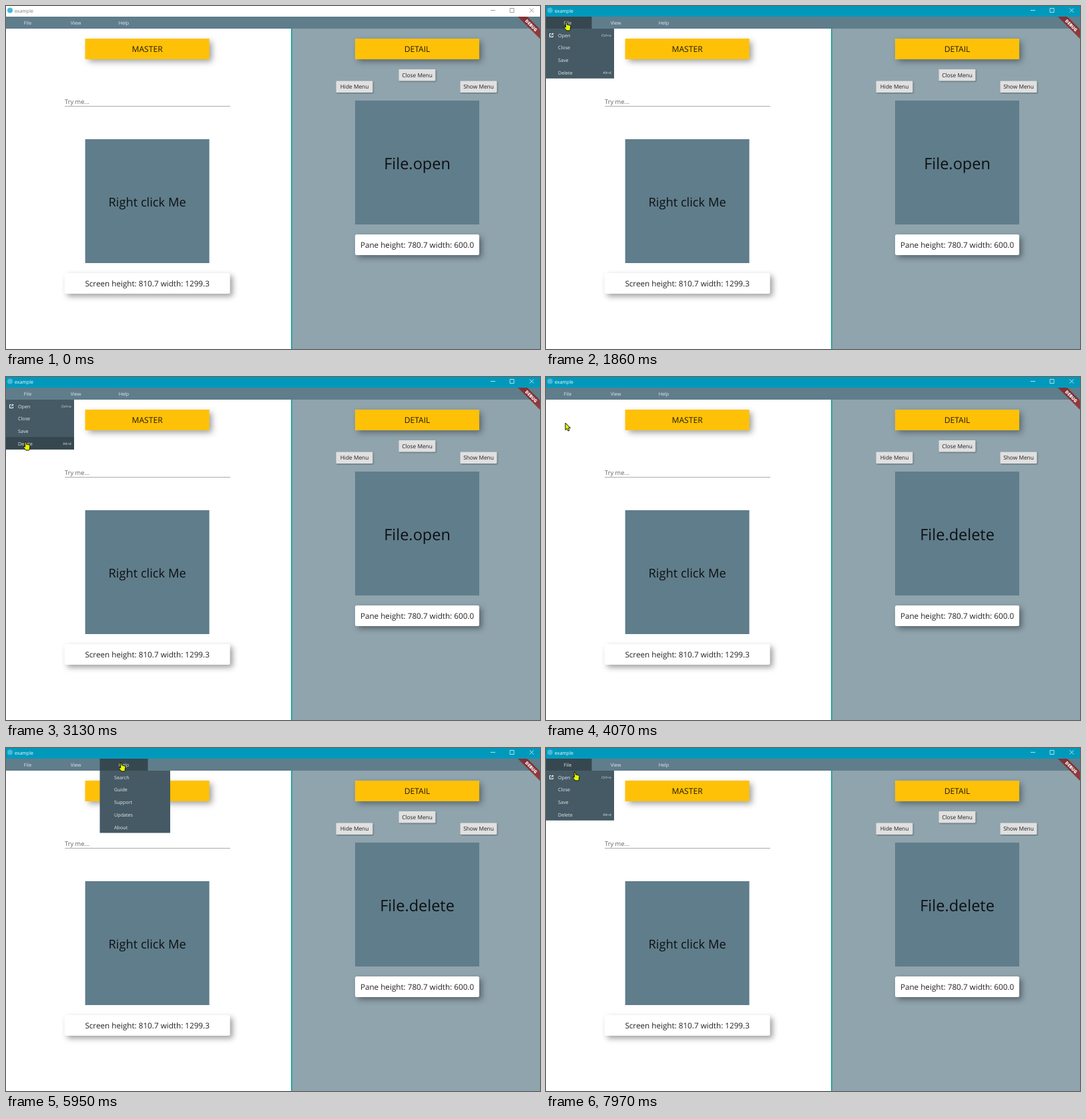
These frames come from a looping animation (800x515 px, 8000 ms). An HTML page with a canvas:

```html
<!DOCTYPE html>
<html lang="en">
<head>
<meta charset="utf-8">
<title>Menu bar demo</title>
<style>
html, body { margin: 0; width: 100%; height: 100%; overflow: hidden; background: #fff; }
canvas { display: block; }
</style>
</head>
<body>
<canvas id="stage" width="800" height="515"></canvas>
<script>
const ctx = document.getElementById('stage').getContext('2d');
ctx.textRendering = 'geometricPrecision';

const LOOP = 8000, TICK = 156.6, START = 120;
const INK = 'rgba(0,0,0,.87)', SLATE = '#607d8b', AMBER = '#ffc107';
const PANEL = '#455a64', HOVER = '#37474f', MENU_TEXT = '#e4eaed';
const BAR_TOP = 16, BAR_END = 34, ROW = 18.7, TAB = 72, DROP = 105.5;
const LEFT = 211.6, RIGHT = 616, SIDE = 186, CARD = 31;

const menus = [
  { label: 'File', items: ['Open', 'Close', 'Save', 'Delete'], keys: { Open: 'Ctrl+o', Delete: 'Alt+d' } },
  { label: 'View', items: ['View all', 'close view', 'jump to', 'go to'], keys: {} },
  { label: 'Help', items: ['Search', 'Guide', 'Support', 'Updates', 'About'], keys: {} }
];
menus.forEach((m, i) => m.x = TAB * i - 3.5);

// Where the pointer is at key ticks; it eases from stop to stop.
const stops = [
  [0, 770, 505], [2, 347, 284], [3, -40, 90], [8, 18, 38], [11, 30, 24], [15, 27, 69],
  [19, 29, 97], [23, 29, 97], [25, 29, 69], [29, 32, 22], [33, 58, 19], [37, 172, 22],
  [41, 128, 22], [47, 43, 21], [50, 43, 36]
];

function pointer(n) {
  const i = stops.findIndex(s => s[0] >= n);
  if (n < 0) return [-40, 90];
  if (i < 1) return stops.at(i).slice(1);
  const [n0, x0, y0] = stops[i - 1], [n1, x1, y1] = stops[i];
  const k = (n - n0) / (n1 - n0), ease = k * k * (3 - 2 * k);
  return [x0 + (x1 - x0) * ease, y0 + (y1 - y0) * ease];
}

function barItem(n) {
  const [x, y] = pointer(n);
  return y < BAR_TOP || y >= BAR_END ? -1 : menus.findIndex(m => x >= m.x && x < m.x + TAB);
}

function openMenu(n) {
  if (n < 10 || (n > 20 && n < 31)) return null;
  let k = n - 1;
  while (k > 0 && barItem(k) < 0) k--;
  return menus[Math.max(0, barItem(k))];
}

function menuRow(menu, n) {
  const [x, y] = pointer(n), row = Math.floor((y - BAR_END) / ROW);
  return menu && x >= menu.x && x < menu.x + DROP && row < menu.items.length ? row : -1;
}

function rect(x, y, w, h, fill) {
  ctx.fillStyle = fill;
  ctx.fillRect(x, y, w, h);
}

function text(str, x, y, size, fill = INK, align = 'center', weight = 400) {
  ctx.font = `${weight} ${size}px "Open Sans", "Noto Sans", sans-serif`;
  ctx.textAlign = align;
  ctx.fillStyle = fill;
  ctx.fillText(str, x, y);
}

// Raised box centred on cx with its label in the middle
function raised(label, cx, y, w, h, fill, size, lift, radius) {
  ctx.save();
  ctx.shadowColor = 'rgba(0,0,0,.38)';
  ctx.shadowBlur = lift * 2;
  ctx.shadowOffsetX = ctx.shadowOffsetY = lift * .9;
  ctx.fillStyle = fill;
  ctx.beginPath();
  ctx.roundRect(cx - w / 2, y, w, h, radius);
  ctx.fill();
  ctx.restore();
  text(label, cx, y + h / 2 + size * .36, size);
}

const card = (label, cx, y, w) => raised(label, cx, y, w, CARD, '#fff', 11.7, 4.5, 2.5);
const heading = (label, cx) => raised(label, cx, 49, SIDE, CARD, AMBER, 12.1, 4.5, 0);
const button = (label, cx, y) => raised(label, cx, y, 55, 17.5, '#e0e0e0', 8.35, 1, 1.2);

function tile(label, cx, y, size) {
  rect(cx - SIDE / 2, y, SIDE, SIDE, SLATE);
  text(label, cx, y + SIDE / 2 + size * .42, size);
}

function panes(result) {
  rect(0, BAR_END, 427, 481, '#fff');
  rect(427, BAR_END, 373, 481, '#90a4ae');
  rect(427, BAR_END, 2, 481, '#26a69a');

  heading('MASTER', LEFT);
  text('Try me...', 88, 146.5, 9.3, 'rgba(0,0,0,.62)', 'left');
  rect(88, 150, 248, 1, '#aaa');
  tile('Right click Me', LEFT, 200, 18.3);
  card('Screen height: 810.7 width: 1299.3', LEFT, 401, 248);

  heading('DETAIL', RIGHT);
  button('Close Menu', RIGHT, 95);
  button('Hide Menu', RIGHT - 94, 112.5);
  button('Show Menu', RIGHT + 92, 112.5);
  tile(result, RIGHT, 142, 23.5);
  card('Pane height: 780.7 width: 600.0', RIGHT, 343, SIDE);
}

function titleBar(active) {
  const tone = active ? '#fff' : '#777';
  rect(0, 0, 800, BAR_TOP, active ? '#0099bc' : '#fff');
  ctx.fillStyle = '#45b8d8';
  ctx.beginPath();
  ctx.arc(6, 6.5, 4, 0, 7);
  ctx.fill();
  text('example', 13, 9.5, 7, tone, 'left');
  ctx.strokeStyle = tone;
  ctx.lineWidth = .7;
  ctx.stroke(new Path2D('M726 6.5h7M755 3.5h6v6h-6zM784.5 3.5l6 6m0-6l-6 6'));
}

function menuBar(hover) {
  rect(0, BAR_TOP, 800, BAR_END - BAR_TOP, SLATE);
  menus.forEach((m, i) => {
    if (i === hover) rect(m.x, BAR_TOP, TAB, BAR_END - BAR_TOP, HOVER);
    text(m.label, m.x + TAB / 2, 28.2, 7.2, MENU_TEXT);
  });
}

function dropDown(menu, active) {
  rect(menu.x, BAR_END, DROP, ROW * menu.items.length, PANEL);
  menu.items.forEach((item, i) => {
    const y = BAR_END + i * ROW, key = menu.keys[item];
    if (i === active) rect(menu.x, y, DROP, ROW, HOVER);
    text(item, menu.x + 21.5, y + 12.7, 7.2, MENU_TEXT, 'left');
    if (key) text(key, menu.x + 101.2, y + 12, 5.2, MENU_TEXT, 'right');
  });
  if (menu === menus[0]) {
    ctx.strokeStyle = '#fff';
    ctx.lineWidth = 1;
    ctx.stroke(new Path2D('M8 41.5H5.5v5h5v-2M7.5 44.5l3-3M9 41.3h1.7V43'));
  }
}

function banner() {
  ctx.save();
  ctx.beginPath();
  ctx.rect(0, BAR_TOP, 800, 499);
  ctx.clip();
  ctx.translate(800, BAR_TOP);
  ctx.rotate(Math.PI / 4);
  rect(-25, 13.5, 50, 10, 'rgba(140,32,32,.8)');
  text('DEBUG', 0, 20.8, 6.5, '#fff', 'center', 800);
  ctx.restore();
}

const arrow = new Path2D('M0 0V10.5L2.4 8.4L4 12L6 11.2L4.4 7.7L7.6 7.6Z');
const hand = new Path2D('M-1 .8Q0-.5 1 .8L1.6 4.2Q3 3.4 3.6 4.7Q5 4 5.5 5.2Q7 4.8 7 6.5L6.3 11.5L5.6 13H.8L-2.4 9Q-3.2 7.4-2 7.2L-.3 8Z');

function drawPointer(x, y, shape) {
  ctx.save();
  ctx.translate(x, y);
  ctx.lineJoin = 'round';
  ctx.lineWidth = 1;
  ctx.fillStyle = '#e4fa00';
  ctx.strokeStyle = '#111';
  ctx.fill(shape);
  ctx.stroke(shape);
  ctx.restore();
}

function draw(time) {
  const n = Math.floor((time % LOOP - START) / TICK);
  const menu = openMenu(n);
  panes(n < 22 ? 'File.open' : 'File.delete');
  // Hover colours trail the pointer by one tick.
  menuBar(barItem(n - 1));
  if (menu) dropDown(menu, menuRow(menu, n - 1));
  banner();
  titleBar(n >= 10);
  const over = barItem(n) >= 0 || menuRow(menu, n) >= 0;
  drawPointer(...pointer(n), over ? hand : arrow);
  requestAnimationFrame(() => draw(performance.now()));
}

draw(0);
</script>
</body>
</html>
```
